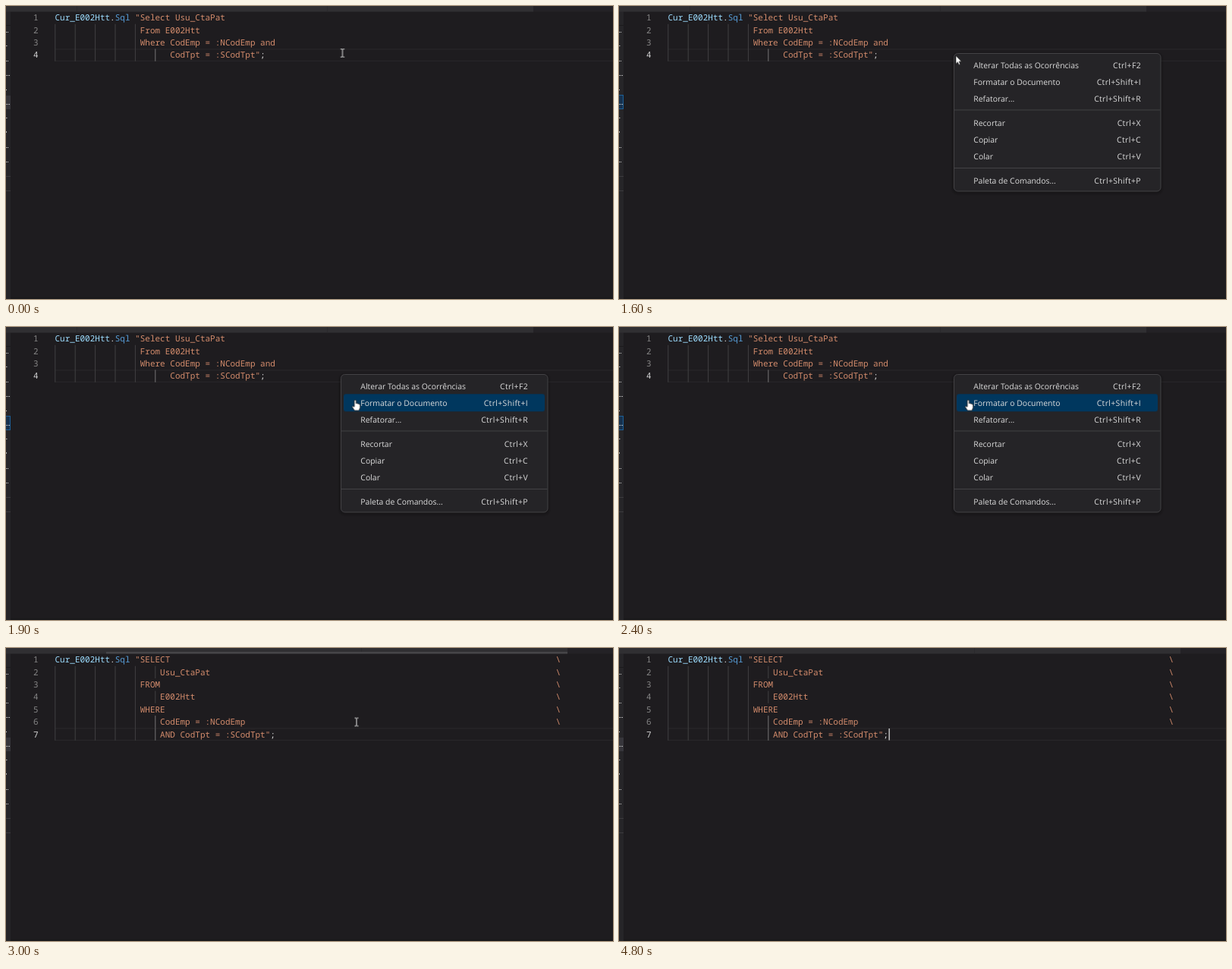
Animation, 800 px wide and 386 px high, one loop 4.9 s. Source, as an HTML page:

```html
<!DOCTYPE html>
<html lang="pt">
<head>
<meta charset="utf-8">
<title>Editor</title>
<style>
  html, body { margin: 0; width: 100%; height: 100%; overflow: hidden; background: #1e1c1f; }
  svg { display: block; width: 800px; height: 386px; }
  text { text-rendering: geometricPrecision; white-space: pre; }
  .code { font: 500 11px "Noto Sans Mono", "DejaVu Sans Mono", monospace; }
  .menu { font: 10.45px "Open Sans", "Noto Sans", sans-serif; fill: #dcdcdc; }
  .keys { text-anchor: end; letter-spacing: .36px; }
</style>
</head>
<body>
<svg id="stage" viewBox="0 0 800 386"></svg>
<script>
const LOOP = 4900, COL = 6.6, ROW = 16.35, LEFT = 64.5, TOP = 7.4;
const stage = document.getElementById('stage');
const colors = { name: '#9cdcfe', dot: '#dcdcdc', prop: '#569cd6', str: '#d48c6c' };

function add(parent, tag, attrs = {}, text) {
  const el = document.createElementNS('http://www.w3.org/2000/svg', tag);
  for (const k in attrs) el.setAttribute(k, attrs[k]);
  if (text) el.textContent = text;
  parent.append(el);
  return el;
}
const group = (parent = stage) => add(parent, 'g');
const rect = (parent, x, y, width, height, fill, more) =>
  add(parent, 'rect', { x, y, width, height, fill, ...more });
const colX = c => LEFT + c * COL;
const rowY = r => TOP + (r - 1) * ROW;

// Plays a table of [ms, style] steps; each style holds until the next one.
function play(el, steps) {
  const frames = steps.map(([ms, style]) => ({ ...style, offset: ms / LOOP, easing: 'step-end' }));
  frames.push({ ...steps.at(-1)[1], offset: 1 });
  el.animate(frames, { duration: LOOP, iterations: Infinity });
}
// Shows an element only from the first to the second time of each pair.
function during(el, ...spans) {
  const steps = spans[0][0] > 0 ? [[0, { opacity: 0 }]] : [];
  for (const [from, to] of spans) {
    steps.push([from, { opacity: 1 }]);
    if (to < LOOP) steps.push([to, { opacity: 0 }]);
  }
  play(el, steps);
}
const at = (x, y) => ({ transform: `translate(${x}px, ${y}px)` });

// Side list
rect(stage, 0, 0, 6, 386, '#262528');
rect(stage, 0, 25, 6, 1, '#1b1a1c');
rect(stage, 0, 118, 6, 18, '#37363b');
const focus = group();
rect(focus, -2, 117.5, 7.5, 18, '#17324e', { stroke: '#1d5f96' });
['..', '-', '..', '...', '.', '...', '-', "'", '..', '..'].forEach((mark, i) => {
  const y = Math.round(35 + i * 18.95);
  if (mark === '-') rect(stage, 0, y - 2, 1.5, 1, '#bbb');
  else if (mark === "'") rect(stage, 0, y - 3, 1, 2, '#aaa');
  else for (let n = 0; n < mark.length; n++) rect(stage, n * 2, y - 1, 1, 1, '#ddd');
});
rect(stage, 0, 224, 6, 1, '#3c3b3e');
rect(stage, 0, 243, 6, 1, '#3c3b3e');
rect(stage, 6, 384, 794, 2, '#19181a');

// Tab strip
function tabs(end, dividers) {
  const g = group();
  rect(g, 6, 0, 794, 7.5, '#242226');
  rect(g, 0, 0, end, 7.5, '#302f32');
  dividers.forEach(x => rect(g, x, 0, 1, 7.5, '#2b2a2d'));
  return g;
}
const tabsBefore = tabs(695, [93, 423]);
const tabsAfter = tabs(740, [468]);
const thumb = rect(stage, 132, 5, 608, 2.5, '#464548');

// Code pages: each line is [column, text, kind, ...]
function page(lines, deepRows, active) {
  const g = group(), last = lines.length;
  for (const y of [rowY(last), rowY(last + 1) - 1])
    rect(g, LEFT, y, 800 - LEFT, 1, '#2b292c');
  for (let c = 0; c <= 16; c += 4)
    rect(g, colX(c) - .2, rowY(2), 1, (last - 1) * ROW, '#414042');
  deepRows.forEach(r =>
    rect(g, colX(20) - .2, rowY(r), 1, ROW, r >= active ? '#757476' : '#414042'));
  lines.forEach((parts, i) => {
    const y = rowY(i + 1) + 12;
    add(g, 'text', { class: 'code', x: 42.6, y, 'text-anchor': 'end',
      fill: i + 1 === last ? '#d4d4d4' : '#858585' }, String(i + 1));
    for (let p = 0; p < parts.length; p += 3)
      add(g, 'text', { class: 'code', x: colX(parts[p]), y, fill: colors[parts[p + 2]] }, parts[p + 1]);
  });
  return g;
}
const head = [0, 'Cur_E002Htt', 'name', 11, '.', 'dot', 12, 'Sql', 'prop'];
const slash = [100, '\\', 'str'];

const before = page([
  [...head, 16, '"Select Usu_CtaPat', 'str'],
  [17, 'From E002Htt', 'str'],
  [17, 'Where CodEmp = :NCodEmp and', 'str'],
  [23, 'CodTpt = :SCodTpt"', 'str', 41, ';', 'dot']
], [4], 4);

const after = page([
  [...head, 16, '"SELECT', 'str', ...slash],
  [21, 'Usu_CtaPat', 'str', ...slash],
  [17, 'FROM', 'str', ...slash],
  [21, 'E002Htt', 'str', ...slash],
  [17, 'WHERE', 'str', ...slash],
  [21, 'CodEmp = :NCodEmp', 'str', ...slash],
  [21, 'AND CodTpt = :SCodTpt"', 'str', 43, ';', 'dot']
], [2, 4, 6, 7], 6);

const caretBefore = rect(stage, colX(42) - .3, rowY(4) + .5, 1.3, 15.5, '#d8d8d8');
const caretAfter = rect(stage, colX(44) + .6, rowY(7) + .5, 1.3, 15.5, '#d8d8d8');

// Context menu
const menu = group();
for (let i = 4; i > 0; i--)
  rect(menu, 441.5 - i, 63 - i + 1, 272.5 + 2 * i, 181.5 + 2 * i, '#000', { rx: 5 + i, opacity: .05 });
rect(menu, 441.5, 62.5, 272.5, 181.5, '#252427', { rx: 5, stroke: '#434245' });
const hover = rect(menu, 445, 0, 265, 23, '#00375e', { rx: 3 });
rect(menu, 442, 136.5, 271.5, 1, '#434245');
rect(menu, 442, 213, 271.5, 1, '#434245');
[
  [78, 'Alterar Todas as Ocorrências', 'Ctrl+F2'],
  [100.2, 'Formatar o Documento', 'Ctrl+Shift+I'],
  [122.6, 'Refatorar...', 'Ctrl+Shift+R'],
  [154.2, 'Recortar', 'Ctrl+X'],
  [176.4, 'Copiar', 'Ctrl+C'],
  [198.8, 'Colar', 'Ctrl+V'],
  [230.5, 'Paleta de Comandos...', 'Ctrl+Shift+P']
].forEach(([y, label, keys], i) => {
  const row = group(menu);
  add(row, 'text', { class: 'menu', x: 467.3, y: y + 3.6 }, label);
  add(row, 'text', { class: 'menu keys', x: 688, y: y + 3.6 }, keys);
});

// Pointers, drawn around their hot spot
const beam = group(), arrow = group(), hand = group();
add(beam, 'path', { d: 'M-2.5-5.2H-.6L0-4.6L.6-5.2H2.5M-2.5 5.2H-.6L0 4.6L.6 5.2H2.5M0-4.8V4.8',
  fill: 'none', stroke: '#e4e4e4', 'stroke-width': 1 });
add(arrow, 'path', { d: 'M0 0V10.6L2.4 8.4L4 12L5.8 11.2L4.2 7.7H7.5Z',
  fill: '#fff', stroke: '#111', 'stroke-width': .6 });
add(hand, 'path', { d: 'M-1.2 1Q0-1 1.2 1V5Q2.4 4 3.2 5.3Q4.4 4.6 5 5.9Q6.4 5.6 6.4 7.2V10.5L5 14.2H-1L-4 9.6Q-4 7.6-1.2 9.2Z',
  fill: '#fff', stroke: '#111', 'stroke-width': .8 });

// Timeline
during(tabsBefore, [0, 2500]);
during(tabsAfter, [2500, LOOP]);
play(thumb, [[0, { opacity: 0 }], [2600, { opacity: .5 }], [2700, { opacity: 1 }],
  [3100, { opacity: .6 }], [3200, { opacity: .3 }], [3300, { opacity: 0 }]]);
during(before, [0, 2500]);
during(after, [2500, LOOP]);
during(caretBefore, [300, 800]);
during(caretAfter, [2500, 3000], [3500, 4000], [4500, LOOP]);
during(focus, [1000, 2500]);
during(menu, [1000, 2500]);
during(hover, [1700, 2500]);
play(hover, [[0, at(0, 88.3)], [1800, at(0, 110.8)], [1900, at(0, 88.3)]]);

during(beam, [0, 1000], [2500, 3900]);
play(beam, [[0, at(443.5, 62)], [2500, at(462, 97.5)], [3500, at(462, 118)],
  [3600, at(463, 157)], [3700, at(464, 214)], [3800, at(465, 284)]]);
during(arrow, [1000, 1700]);
play(arrow, [[0, at(444, 65.5)]]);
during(hand, [1700, 2500]);
play(hand, [[0, at(452, 92)], [1800, at(461, 116)], [1900, at(460.3, 95.8)]]);
</script>
</body>
</html>
```
